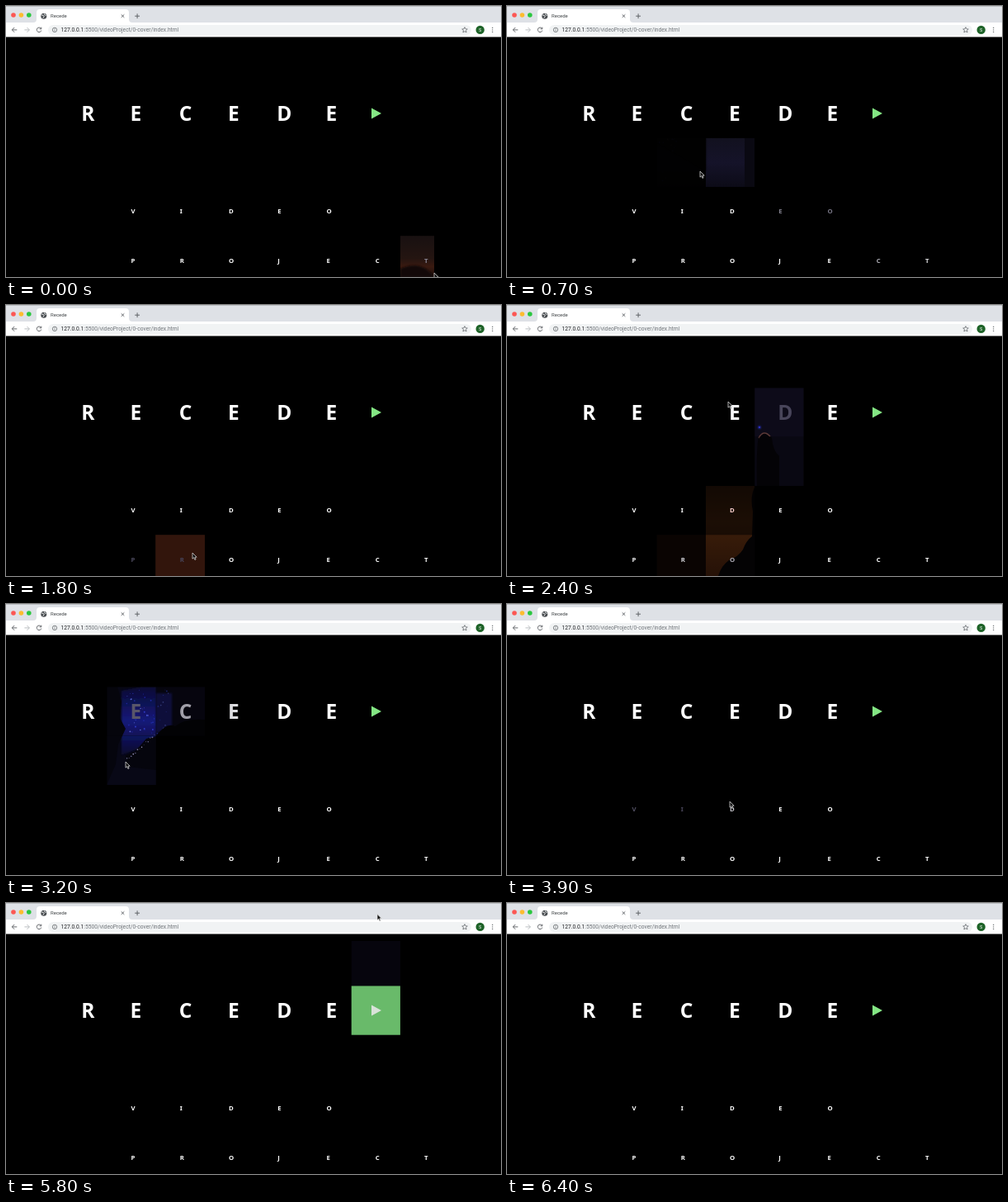
An HTML page for the animation above (6500 ms loop, 600x328 px).

```html
<!DOCTYPE html>
<html lang="en">
<head>
<meta charset="utf-8">
<title>Recede</title>
<style>
  html, body { margin: 0; width: 100%; height: 100%; overflow: hidden; background: #000; }
  svg { display: block; width: 100vw; height: 100vh; }
  .ui { font-family: Roboto, "Open Sans", sans-serif; }
  .letter { font-family: "Noto Sans", "Open Sans", sans-serif; font-weight: 700; fill: #fff; }
  .line { fill: none; stroke: #55595d; stroke-width: .9; }
</style>
</head>
<body>
<svg viewBox="0 0 600 328" xmlns="http://www.w3.org/2000/svg">
  <defs>
    <mask id="reveal" maskUnits="userSpaceOnUse" x="0" y="0" width="600" height="328"></mask>
    <filter id="soft" x="-20%" y="-20%" width="140%" height="140%"><feGaussianBlur stdDeviation="1.3"/></filter>
    <linearGradient id="dusk" x2="0" y2="1">
      <stop offset="0" stop-color="#251a1a"/><stop offset=".55" stop-color="#38201b"/>
      <stop offset=".75" stop-color="#5a2819"/><stop offset="1" stop-color="#2a1512"/>
    </linearGradient>
    <linearGradient id="street" x2="0" y2="1">
      <stop offset="0" stop-color="#12111f"/><stop offset=".5" stop-color="#151329"/><stop offset="1" stop-color="#0c0b17"/>
    </linearGradient>
    <linearGradient id="ground" x2="0" y2="1">
      <stop offset="0" stop-color="#5e2f12"/><stop offset=".4" stop-color="#8a4518"/><stop offset="1" stop-color="#54270f"/>
    </linearGradient>
    <linearGradient id="tower" x2="0" y2="1">
      <stop offset="0" stop-color="#0a0c38"/><stop offset=".5" stop-color="#171c86"/><stop offset="1" stop-color="#0a0a2c"/>
    </linearGradient>
    <linearGradient id="pole" x2="0" y2="1">
      <stop offset="0" stop-color="#c4a99c"/><stop offset=".2" stop-color="#a3654a"/><stop offset="1" stop-color="#55301f"/>
    </linearGradient>
  </defs>

  <rect width="600" height="328"/>

  <g mask="url(#reveal)">
    <g class="scene">
      <rect x="81" y="46" width="438" height="282" fill="#140e12"/>
      <rect x="81" y="278" width="438" height="50" fill="url(#dusk)"/>
      <path d="M478 328V318q14-6 24-3t17 13z" fill="#1c0e0c" filter="url(#soft)"/>
    </g>
    <g class="scene">
      <rect x="81" y="160" width="207" height="59" fill="url(#street)"/>
      <rect x="288" y="160" width="12" height="59" fill="#0a0912"/>
      <path d="M81 160h46l-22 34-24 6zM172 160h69v40z" fill="#080810" filter="url(#soft)"/>
      <g id="streetLights"></g>
    </g>
    <g class="scene">
      <rect x="300" y="46" width="119" height="173" fill="#0d0b19"/>
      <rect x="181" y="219" width="60" height="109" fill="#32150c"/>
      <rect x="241" y="219" width="59" height="109" fill="url(#ground)"/>
      <path d="M301 219q-7 12-3 31l-1 30q-7 5-11 16-6 9-17 13-9 6-13 19h45z" fill="#08060a"/>
      <path d="M303 219q-1-45 2-60 8-10 16 2 1 15 9 22v36z" fill="#050408"/>
      <path d="M305 161q6-11 14-2" fill="none" stroke="#5c3a38" stroke-width="1.6"/>
      <circle cx="306" cy="148" r="1.6" fill="#2932d8" filter="url(#soft)"/>
      <circle cx="306" cy="148" r="1" fill="#3038d8"/>
      <path d="M340 100v119" stroke="#14112a" stroke-width="14" filter="url(#soft)"/>
    </g>
    <g class="scene">
      <rect x="122" y="100" width="60" height="119" fill="#080816"/>
      <rect x="182" y="100" width="59" height="60" fill="#0b0a1c"/>
      <path d="M140 105l25-5h17v66l-42 17z" fill="url(#tower)" filter="url(#soft)"/>
      <path d="M182 108h19v42l-19 6z" fill="#1a1d70" filter="url(#soft)"/>
      <g id="towerLights"></g>
      <path d="M122 100h13l5 18-2 20 7 13-9 19-3 24-11 25zM182 160l-12 3-14 16-11 4 2 14 35 4z" fill="#05050d"/>
      <g id="pathLights"></g>
      <path d="M182 160q12-17 23-12 11-10 36-8v20z" fill="#040408"/>
    </g>
    <g class="scene">
      <rect x="300" y="160" width="60" height="59" fill="#1d1a30"/>
      <rect x="359" y="41" width="60" height="178" fill="#14101f"/>
      <path d="M316 219q3-22 1-50 5-8 11 0l2 50z" fill="#0c0a16" filter="url(#soft)"/>
      <path d="M379 114h40M379 150h40M379 185h40" stroke="#1a1634" stroke-width="8" filter="url(#soft)"/>
      <path d="M362 100h5l-2 119h-5z" fill="url(#pole)"/>
      <path d="M361 119l6 9 4 30 5 36-1 25h-10z" fill="#07060c"/>
      <path d="M368 201q6-2 6 6l-3 12" fill="none" stroke="#4d3029" stroke-width="1.5"/>
      <circle cx="403" cy="127" r="2.5" fill="#24209a" filter="url(#soft)"/>
      <rect x="320" y="219" width="39" height="59" fill="#421409"/>
      <path d="M308 223l7 55h-14z" fill="#2e0e08"/>
    </g>
    <g class="scene"><rect x="81" y="46" width="438" height="282" fill="#0a0814"/></g>
  </g>

  <rect id="tile" x="418.7" y="100.4" width="59.2" height="59.3" fill="#73cb74"/>
  <path id="play" d="M443 123.6l12 6.3-12 6.6z"/>
  <g id="letters"></g>

  <g class="ui">
    <rect width="600" height="20" fill="#dee1e6"/>
    <rect width="600" height=".6" fill="#a5a7aa"/>
    <path d="M33 20q4 0 4-4V8q0-4 4-4h104q4 0 4 4v8q0 4 4 4z" fill="#fff"/>
    <circle cx="9" cy="11" r="2.8" fill="#fc5753"/>
    <circle cx="18.4" cy="11" r="2.8" fill="#fdbc2f"/>
    <circle cx="27.8" cy="11" r="2.8" fill="#2ac73f"/>
    <circle cx="45.8" cy="12.2" r="3.5" fill="#4a4e52"/>
    <path d="M43 11l2.2.3 1 1.3-1.4 2M46.5 9.4l.3 1.3 1.8.7" class="line" style="stroke:#fff"/>
    <text x="54" y="14.3" font-size="6" fill="#3c4043">Recede</text>
    <path class="line" d="M139.7 10.3l3.6 3.6m0-3.6l-3.6 3.6M156.2 12.2h5.8m-2.9-2.9v5.8"/>
    <rect y="20" width="600" height="17.5" fill="#fff"/>
    <rect x="51" y="23" width="513" height="12" rx="6" fill="#f1f3f4"/>
    <path class="line" d="M13.3 28.9H7.4m2.8-2.9l-2.9 2.9 2.9 2.9"/>
    <path class="line" d="M22.4 28.9h5.9m-2.8-2.9l2.9 2.9-2.9 2.9" style="stroke:#b5b8bb"/>
    <path class="line" d="M42.3 27.1a2.8 2.8 0 1 0 .5 2.5M42.8 25.7v2.1h-2.1"/>
    <circle class="line" cx="59" cy="28.9" r="2.7" style="stroke-width:.7"/>
    <path class="line" d="M59 28.5v1.9m0-3.3v.7" style="stroke-width:.7"/>
    <text x="66.5" y="31.2" font-size="6.7" fill="#70757a"><tspan fill="#202124">127.0.0.1</tspan>:5500/videoProject/0-cover/index.html</text>
    <path class="line" style="stroke-width:.7" d="M556 25.6l1 2.2 2.3.2-1.8 1.6.6 2.4-2.1-1.3-2.1 1.3.6-2.4-1.8-1.6 2.3-.2z"/>
    <circle cx="574.7" cy="28.9" r="5.2" fill="#1e6328"/>
    <text x="574.7" y="30.9" font-size="5.5" fill="#fff" text-anchor="middle">S</text>
    <path d="M589.7 26.4v.01m0 2.49v.01m0 2.49v.01" stroke="#55595d" stroke-width="1.3" stroke-linecap="round"/>
  </g>

  <path id="cursor" d="M0 0v7.2l1.7-1.5 1.2 2.7 1.2-.5-1.2-2.7h2.3z" fill="#111" stroke="#e8e8e8" stroke-width=".7"/>
</svg>

<script>
const LOOP = 6500, FRAME = 100, STEP = 10;
const CELL = 59.25, LEFT = 4, TOP = 41.2, COLS = 9, ROWS = 5;
const TILE = COLS + 7;
const $ = id => document.getElementById(id);

function add(parent, tag, attrs) {
  const node = document.createElementNS("http://www.w3.org/2000/svg", tag);
  for (const key in attrs) node.setAttribute(key, attrs[key]);
  return parent.appendChild(node);
}

// Pointer path: time, x, y
const path = [
  [0, 519, 323], [120, 470, 315], [300, 400, 270], [450, 350, 225], [550, 310, 210],
  [700, 234, 200], [850, 184, 200], [1000, 124, 203], [1150, 84, 218], [1200, 80, 232],
  [1500, 95, 250], [1650, 150, 295], [1750, 200, 300], [1850, 252, 300], [1960, 272, 290],
  [1990, 280, 250], [2020, 299, 222], [2095, 325, 162], [2300, 330, 130], [2385, 303, 118],
  [2400, 268, 117], [2600, 245, 118], [2750, 200, 122], [2900, 150, 130], [3200, 145, 191],
  [3600, 140, 205], [3750, 165, 228], [3850, 230, 240], [3950, 310, 238], [4030, 335, 215],
  [4150, 362, 205], [4250, 392, 185], [4330, 403, 152], [4500, 411, 139], [4850, 413, 138],
  [5050, 445, 130], [5700, 449, 128], [5800, 450, 13.5], [LOOP, 450, 13.5]
];
const cuts = [0, 450, 1500, 2600, 3700, 5200, LOOP];

function pointer(t) {
  const i = path.findIndex(p => p[0] > t);
  const [a, b] = [path[i - 1], path[i]];
  const k = (t - a[0]) / (b[0] - a[0]);
  return [a[1] + (b[1] - a[1]) * k, a[2] + (b[2] - a[2]) * k];
}

function cellAt([x, y]) {
  const col = Math.floor((x - LEFT) / CELL), row = Math.floor((y - TOP) / CELL);
  return row < 0 ? -1 : row * COLS + col;
}

// Hovered cells light up quickly, then fade slowly once left
const history = [];
const levels = Array(COLS * ROWS).fill(0);
levels[4 * COLS + 8] = .6;
for (let t = 0; t < LOOP; t += STEP) {
  if (t % FRAME === 0) history.push(levels.slice());
  const hovered = cellAt(pointer(t));
  levels.forEach((v, i) => {
    const change = i === hovered ? STEP / 80 : -STEP / (i === TILE ? 400 : 800);
    levels[i] = Math.min(1, Math.max(0, v + change));
  });
}
const smooth = v => v * v * (3 - 2 * v);

const masks = levels.map((_, i) => add($("reveal"), "rect", {
  x: LEFT + i % COLS * CELL, y: TOP + Math.floor(i / COLS) * CELL,
  width: CELL, height: CELL, fill: i === TILE ? "#000" : "#fff"
}));

const letters = [];
function word(text, col, row, x, y, size) {
  [...text].forEach((char, i) => {
    const node = add($("letters"), "text", { class: "letter", x: x + i * CELL, y, "font-size": size });
    node.textContent = char;
    letters.push({ node, cell: row * COLS + col + i });
  });
}
word("RECEDE", 1, 1, 91.3, 139, 24.5);
word("VIDEO", 2, 3, 151.6, 251.3, 7.8);
word("PROJECT", 2, 4, 151.4, 310.8, 7.8);

let seed = 7;
const random = () => (seed = seed * 16807 % 2147483647) / 2147483647;
function lights(id, count, place, colors) {
  for (let i = 0; i < count; i++) {
    const [cx, cy] = place(i / count);
    add($(id), "circle", { cx, cy, r: .4 + random() * .6, fill: colors[i % colors.length] });
  }
}
lights("streetLights", 42, () => [130 + random() * 80, 161 + random() ** 2 * 18], ["#3c3fae", "#8b7470", "#282b80"]);
lights("streetLights", 14, () => [140 + random() * 55, 182 + random() * 34], ["#292d86", "#39364f"]);
lights("towerLights", 50, () => [145 + random() * 52, 104 + random() * 55], ["#3440d8", "#222bb0", "#6170e8"]);
lights("pathLights", 14, k => [180 - k * 36, 157 + k * 32 + random() * 3], ["#9b95bd", "#6b6890"]);

const scenes = [...document.querySelectorAll(".scene")];
const mix = (a, b, k) => `rgb(${a.map((v, i) => Math.round(v + (b[i] - v) * k))})`;

function draw(t) {
  const now = history[Math.floor(t / FRAME)].map(smooth);
  masks.forEach((node, i) => node.setAttribute("opacity", now[i]));
  scenes.forEach((node, i) => node.setAttribute("display", t >= cuts[i] && t < cuts[i + 1] ? "inline" : "none"));
  const warm = t > 1500 && t < 2600;
  letters.forEach(({ node, cell }) => {
    const red = warm && cell === 3 * COLS + 4;
    node.style.fill = mix([255, 255, 255], red ? [255, 45, 35] : [72, 69, 90], now[cell]);
  });
  $("tile").setAttribute("opacity", now[TILE]);
  $("play").setAttribute("fill", mix([132, 230, 132], [224, 226, 224], now[TILE]));
  const [x, y] = pointer(t);
  $("cursor").setAttribute("transform", `translate(${x} ${y})`);
  $("cursor").setAttribute("display", t < 6300 ? "inline" : "none");
}

const start = performance.now();
function tick() {
  const t = (performance.now() - start) % LOOP;
  draw(Math.floor(t / FRAME) * FRAME);
  requestAnimationFrame(tick);
}
tick();
</script>
</body>
</html>
```
